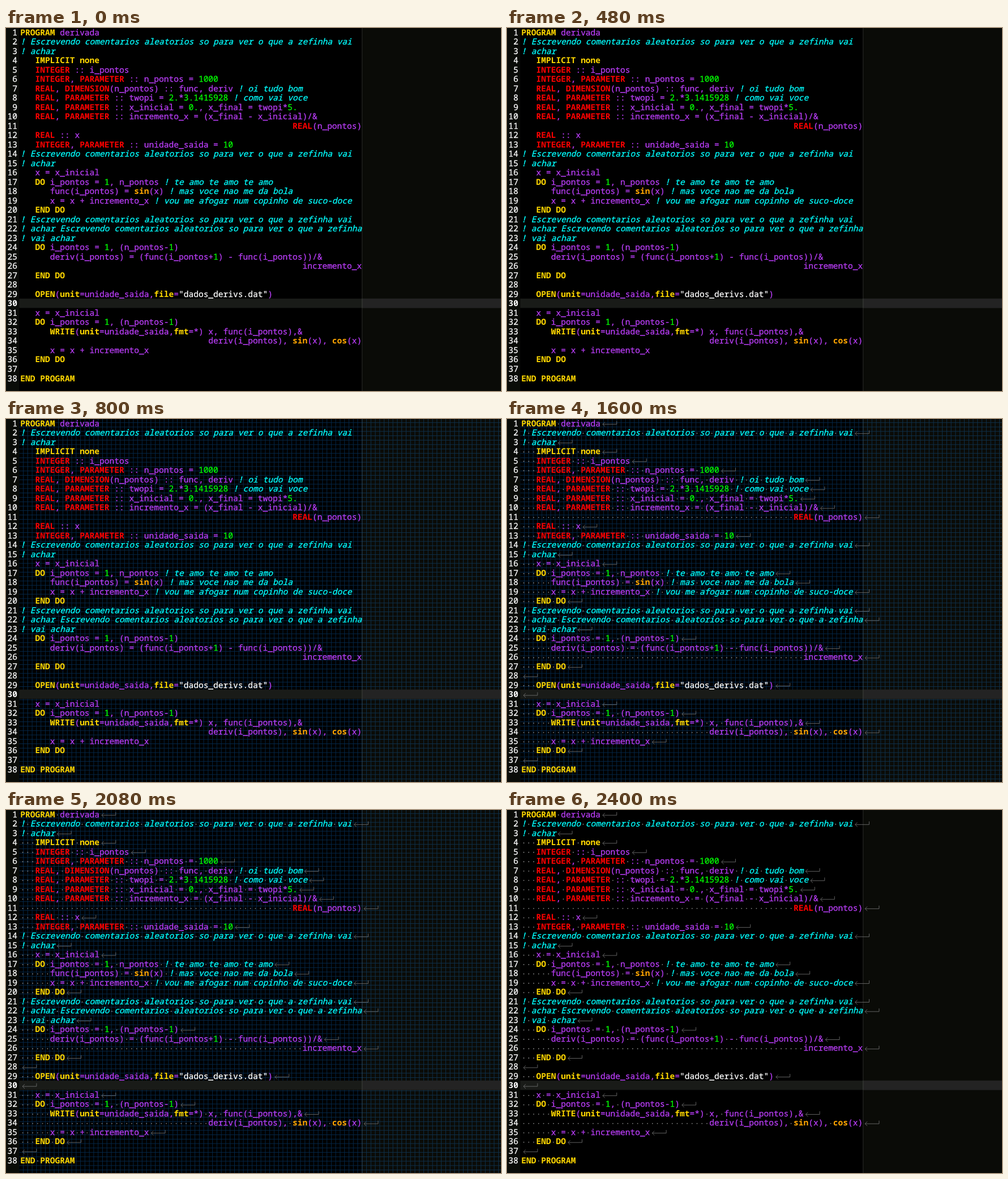
Animation, 874 px wide and 641 px high, one loop 3200 ms. Source, as an HTML page:

```html
<!DOCTYPE html>
<html lang="pt">
<head>
<meta charset="utf-8">
<style>
  html, body { margin: 0; width: 100%; height: 100%; overflow: hidden; background: #000; }
  svg { display: block; width: 874px; height: 641px; }
  text {
    font: 15px "Noto Sans Mono", "DejaVu Sans Mono", monospace; text-rendering: geometricPrecision;
    color: #b83df5; fill: currentColor; stroke: currentColor; stroke-width: .3;
  }
  .number { color: #fff; text-anchor: end; }
  .comment { color: #0ff; font-style: italic; }
  .string { color: #fff; }
  .keyword { color: #ffd700; }
  .type { color: #f00; }
  .call { color: #ffa500; }
  .digit { color: #0f0; }
  .current, .keyword, .type, .call { font-weight: bold; stroke: none; }
  #grid { fill: none; stroke: #06294a; }
  #marks path { fill: none; stroke: #707070; stroke-width: .9; }
  #marks circle { fill: #8a8a8a; }
</style>
</head>
<body>
<svg viewBox="0 0 900 660" preserveAspectRatio="none">
  <path id="grid"/>
  <rect width="24" height="660" fill="#0a0c08"/>
  <rect x="24" y="492" width="876" height="17" fill="#191b18"/>
  <rect x="647" width="253" height="660" fill="#8f9e68" opacity=".07"/>
  <rect x="648" y="492" width="252" height="17" fill="#232323"/>
  <path d="M647.5 0V660" stroke="#fff" opacity=".14"/>
  <g id="marks"></g>
  <g id="code"></g>
</svg>
<script>
const CHAR = 9, LINE = 17, LEFT = 26, CURRENT = 30;
const pad = n => ' '.repeat(n);
const remark = '! Escrevendo comentarios aleatorios so para ver o que a zefinha vai';
const source = `PROGRAM derivada
${remark}
! achar
   IMPLICIT none
   INTEGER :: i_pontos
   INTEGER, PARAMETER :: n_pontos = 1000
   REAL, DIMENSION(n_pontos) :: func, deriv ! oi tudo bom
   REAL, PARAMETER :: twopi = 2.*3.1415928 ! como vai voce
   REAL, PARAMETER :: x_inicial = 0., x_final = twopi*5.
   REAL, PARAMETER :: incremento_x = (x_final - x_inicial)/&
${pad(55)}REAL(n_pontos)
   REAL :: x
   INTEGER, PARAMETER :: unidade_saida = 10
${remark}
! achar
   x = x_inicial
   DO i_pontos = 1, n_pontos ! te amo te amo te amo
      func(i_pontos) = sin(x) ! mas voce nao me da bola
      x = x + incremento_x ! vou me afogar num copinho de suco-doce
   END DO
${remark}
! achar Escrevendo comentarios aleatorios so para ver o que a zefinha
! vai achar
   DO i_pontos = 1, (n_pontos-1)
      deriv(i_pontos) = (func(i_pontos+1) - func(i_pontos))/&
${pad(57)}incremento_x
   END DO

   OPEN(unit=unidade_saida,file="dados_derivs.dat")

   x = x_inicial
   DO i_pontos = 1, (n_pontos-1)
      WRITE(unit=unidade_saida,fmt=*) x, func(i_pontos),&
${pad(38)}deriv(i_pontos), sin(x), cos(x)
      x = x + incremento_x
   END DO

END PROGRAM`.split('\n');

const styles = [
  ['comment', /^!/],
  ['string', /^"/],
  ['keyword', /^(PROGRAM|IMPLICIT|none|DO|END|OPEN|WRITE|unit|file|fmt)$/],
  ['type', /^(INTEGER|REAL|PARAMETER|DIMENSION)$/],
  ['call', /^(sin|cos)$/],
  ['digit', /^\d/]
];

const byId = id => document.getElementById(id);

function add(parent, tag, attributes, content = '') {
  const node = document.createElementNS(parent.namespaceURI, tag);
  for (const name in attributes) node.setAttribute(name, attributes[name]);
  node.textContent = content;
  parent.append(node);
}

const grid = byId('grid'), marks = byId('marks'), code = byId('code');

let lattice = '';
for (let x = 23.5; x < 900; x += 8) lattice += `M${x} 0V660`;
for (let y = -1.5; y < 660; y += 8) lattice += `M24 ${y}H900`;
grid.setAttribute('d', lattice);

source.forEach((line, row) => {
  const top = row * LINE - 1, y = top + 14, middle = top + 10;
  add(code, 'text', { x: 20.7, y, class: row + 1 === CURRENT ? 'number current' : 'number' }, row + 1);
  for (const { 0: token, index } of line.matchAll(/!.*|"[^"]*"|\d+\.?\d*|\w+|[^\s\w]/g)) {
    const style = styles.find(([, pattern]) => pattern.test(token));
    add(code, 'text', { x: LEFT + index * CHAR, y, class: style ? style[0] : '' }, token);
  }
  for (const { index } of line.matchAll(/ /g))
    add(marks, 'circle', { cx: LEFT + (index + .5) * CHAR, cy: middle, r: .95 });
  if (row < source.length - 1) {
    const x = LEFT + line.length * CHAR + 4;
    add(marks, 'path', { d: `M${x + 25.5} ${middle - 5.2}v5.7h-25.5l4-4m-4 4l4 4` });
  }
});

function draw(now) {
  const step = Math.floor(now % 3200 / 800);
  grid.style.display = step === 1 || step === 2 ? '' : 'none';
  marks.style.display = step >= 2 ? '' : 'none';
}

const start = performance.now();
function tick() {
  draw(performance.now() - start);
  requestAnimationFrame(tick);
}
tick();
</script>
</body>
</html>
```
